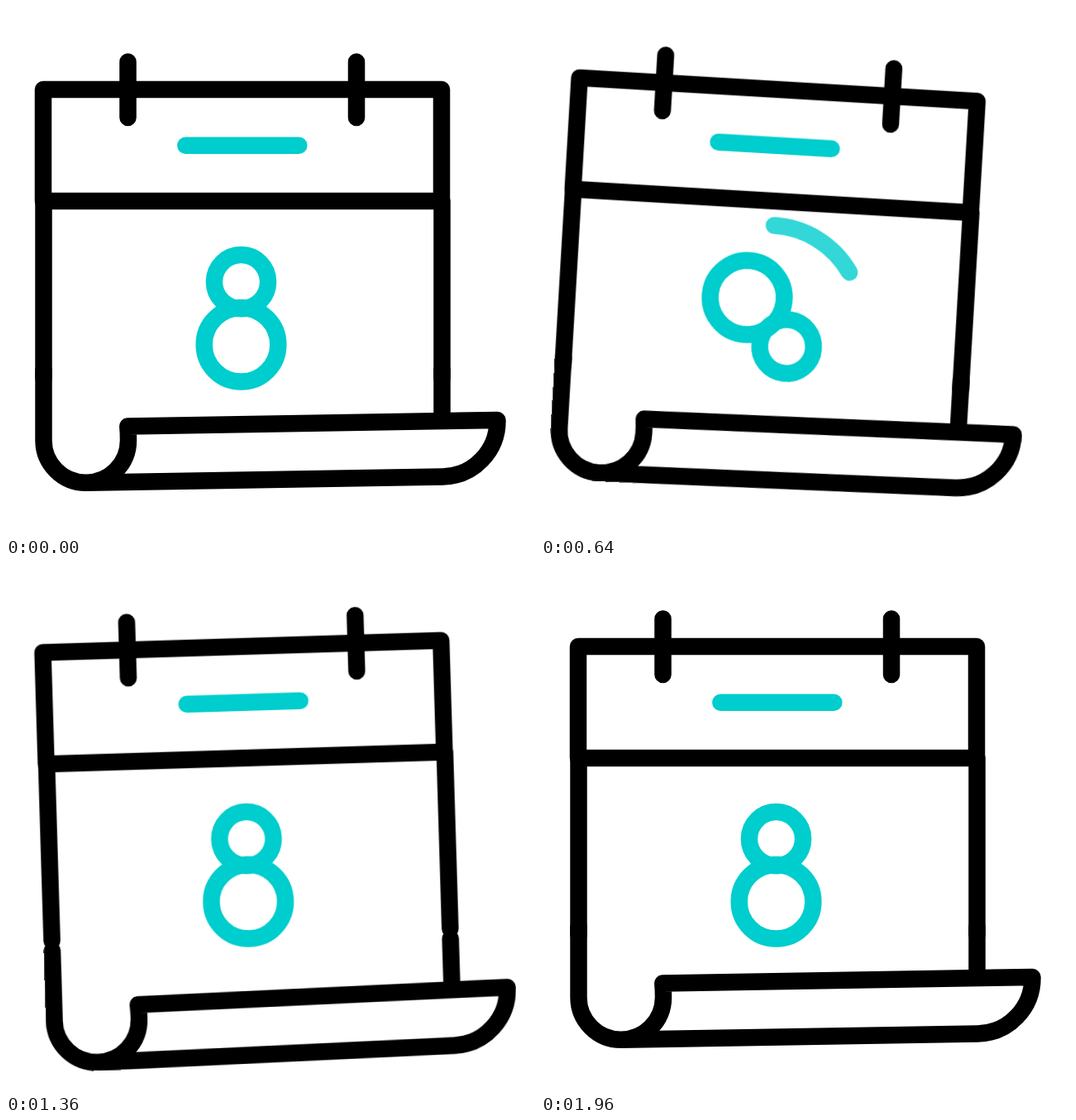
Write an HTML page that moves like this. It is 640 px wide and 640 px high and loops after 2400 ms.

```html
<!DOCTYPE html>
<html lang="en">
<head>
<meta charset="utf-8">
<title>Swinging calendar</title>
<style>
  @property --head { syntax: "<length>"; inherits: false; initial-value: 0px; }
  @property --tail { syntax: "<length>"; inherits: false; initial-value: 0px; }

  html, body { margin: 0; width: 100%; height: 100%; overflow: hidden; background: #fff; }
  svg { display: block; width: 100%; height: 100%; }

  path, circle {
    fill: none;
    stroke: #000;
    stroke-width: 20.5;
    stroke-linecap: round;
    stroke-linejoin: round;
  }
  .teal, .teal * { stroke: #00cdcd; }

  .calendar, .curl, .digit, .trail {
    animation: 2400ms cubic-bezier(.333, 0, .667, 1) infinite;
  }
  .calendar { transform-origin: 286px 121px; animation-name: swing; }
  .curl { animation-name: tug; }
  .digit {
    transform-origin: 284.5px 378px;
    animation-name: spin;
    animation-timing-function: cubic-bezier(.14, 0, .41, 1);
  }
  /* The path length is 360, so both ends of the trail are in degrees. */
  .trail {
    stroke-opacity: .8;
    stroke-dasharray: calc(var(--head) - var(--tail)) 1000px;
    stroke-dashoffset: calc(var(--tail) * -1);
    animation-name: head, tail, show;
    animation-timing-function: cubic-bezier(.333, 0, .667, 1), cubic-bezier(.333, 0, .667, 1), step-end;
  }

  @keyframes swing {
    0%, 81.667%, 100% { transform: rotate(0deg); }
    11.667% { transform: rotate(-5deg); }
    23.333% { transform: rotate(5deg); }
    35% { transform: rotate(-3deg); }
    46.667% { transform: rotate(3deg); }
    58.333% { transform: rotate(-2deg); }
    70% { transform: rotate(2deg); }
  }
  @keyframes tug {
    0%, 41.667%, 73.333%, 100% { transform: translateY(0); }
    55% { transform: translateY(24px); }
    65% { transform: translateY(-4px); }
  }
  @keyframes spin {
    0%, 16.167% { transform: rotate(0deg); }
    56.667%, 100% { transform: rotate(360deg); }
  }
  @keyframes head {
    0%, 20.833% { --head: 0px; }
    44.167%, 100% { --head: 360px; }
  }
  @keyframes tail {
    0%, 28.333% { --tail: 0px; }
    51.667%, 100% { --tail: 360px; }
  }
  @keyframes show {
    0%, 51.667%, 100% { visibility: hidden; }
    20.833% { visibility: visible; }
  }
</style>
</head>
<body>
<svg viewBox="0 0 640 640">
  <g class="calendar">
    <path class="teal trail" pathLength="360" d="M290.5 265.5a112.5 112.5 0 0 1 0 225a112.5 112.5 0 0 1 0-225"/>
    <g class="teal digit">
      <circle cx="284.5" cy="333.7" r="32.6"/>
      <circle cx="284.5" cy="409.8" r="44.8"/>
    </g>
    <path d="M45 101H527V236H45Z"/>
    <path d="M45.5 236V450M527.5 236V450"/>
    <path d="M147.5 67.5V135M424 67.5V135"/>
    <path class="teal" d="M217.3 168.7H354.3"/>
    <!-- The lower ends of the sides move with the curl, so the sheet stretches. -->
    <g class="curl">
      <path d="M527.5 440V497"/>
      <path d="M45.5 440V525.5A51.2 51.2 0 0 0 96.7 576.7C125 576.7 148 554 148 525.5Q148 516 147.3 508.5L594.5 501A67.5 67.5 0 0 1 528.5 569.5L96.7 576.7"/>
    </g>
  </g>
</svg>
</body>
</html>
```
